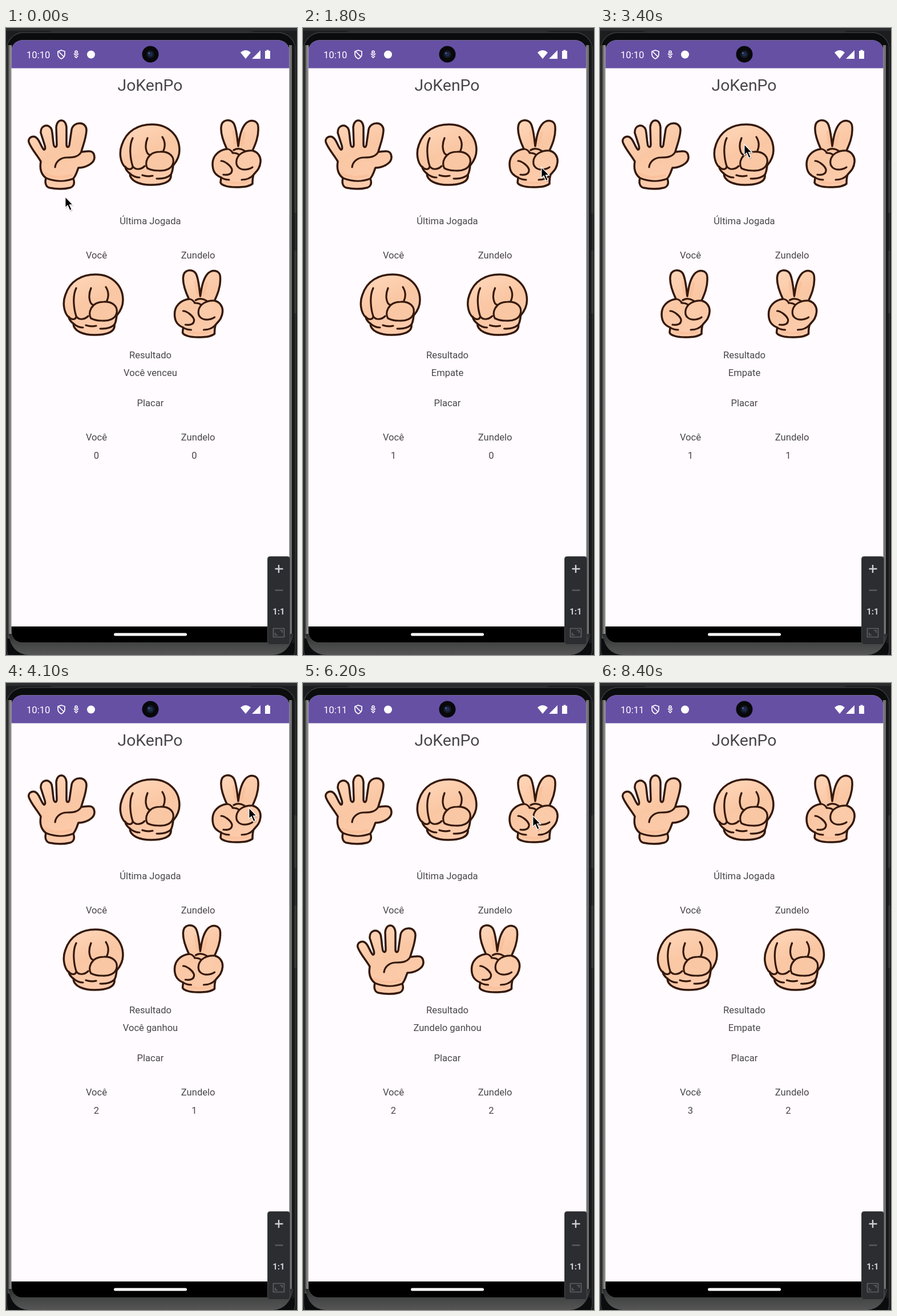
Animation of 510 by 1099 pixels, one loop 9870 ms. Source, as an HTML page:

```html
<!DOCTYPE html>
<html lang="pt">
<head>
<meta charset="utf-8">
<title>JoKenPo</title>
<style>
html, body { margin: 0; width: 100%; height: 100%; overflow: hidden; background: #1c1d1f; }
svg { display: block; width: 510px; height: 1099px; }
text { font: 16.6px Roboto, sans-serif; fill: #49464b; text-anchor: middle; }
.title { font-size: 28.4px; }
.status { fill: #fff; }
.line { fill: none; stroke: #35190c; stroke-width: 3.2; stroke-linecap: round; stroke-linejoin: round; }
.skin { stroke: #35190c; stroke-width: 3.5; stroke-linejoin: round; }
.shade { fill: none; stroke: #f3ad83; stroke-width: 5; stroke-linecap: round; opacity: .3; }
.icon { fill: none; stroke: #fff; stroke-width: 1.7; }
</style>
</head>
<body>
<svg viewBox="0 0 510 1099">
  <defs>
    <linearGradient id="tone" x1="0" y1="0" x2=".45" y2="1">
      <stop offset="0" stop-color="#ffd9bd"/><stop offset=".55" stop-color="#fac7a4"/><stop offset="1" stop-color="#fccbab"/>
    </linearGradient>
    <linearGradient id="rim">
      <stop offset="0" stop-color="#1b1c1d"/><stop offset=".3" stop-color="#4c4c4c"/><stop offset=".6" stop-color="#858483"/><stop offset="1" stop-color="#8f8e8d"/>
    </linearGradient>
    <linearGradient id="base" x1="0" y1="0" x2="0" y2="1">
      <stop offset="0" stop-color="#2a2b2c"/><stop offset=".5" stop-color="#454646"/><stop offset="1" stop-color="#565656"/>
    </linearGradient>
    <clipPath id="screen"><rect x="9.5" y="21.5" width="487" height="1056" rx="19"/></clipPath>

    <g id="paper">
      <path class="skin" fill="url(#tone)" d="M61 234C54 222 43 210 40 200C38 191 49 187 55 194C60 200 61 207 66 213C69 214 69 210 68 206L61 184C60 169 76 167 80 178C82 186 82 198 84 206C86 210 89 209 89 204L88 174C89 158 105 158 106 174L106 204C106 210 110 210 111 205L115 178C118 163 142 163 141 180C140 195 135 205 132 217C140 217 154 211 155 226C156 238 138 245 127 245C124 252 123 258 118 264C121 272 119 278 112 280C100 283 85 282 76 280C69 278 68 270 70 263C61 256 59 245 61 234Z"/>
      <path class="shade" d="M69 256Q91 266 113 258"/>
      <path class="line" d="M86 244C87 234 96 227 107 227C118 227 127 226 132 217M70 263Q95 273 118 264"/>
    </g>

    <g id="rock">
      <path class="skin" fill="url(#tone)" d="M209 244C200 236 198 218 203 205C211 180 232 169 256 169C284 169 304 188 304 214C304 226 299 234 293 241C292 248 292 252 289 257C291 270 275 275 254 275C234 275 217 268 217 255C213 252 210 249 209 244Z"/>
      <path class="line" d="M222 193C215 207 218 230 222 242M248 193C242 207 246 220 251 222M274 191C279 199 279 208 276 215M209 243C214 250 222 248 222 242C226 249 236 249 243 242M217 255Q225 262 234 262M239 258Q248 261 257 259M264 264Q280 265 289 257"/>
      <path class="line" style="fill:#fac7a4" d="M248 246C242 238 247 217 270 217C286 216 295 225 293 236C291 247 279 251 267 250C260 250 254 249 248 246"/>
    </g>

    <g id="scissors">
      <path class="skin" fill="url(#tone)" d="M387 212C381 199 376 186 377 174C378 159 394 159 399 167C404 175 405 192 407 207C409 194 411 180 418 170C426 158 443 161 442 175C443 190 437 204 432 215C441 217 447 225 446 235C445 247 438 252 434 257C432 262 432 266 432 273C424 279 413 279 403 279C389 279 378 276 376 271L377 262C365 257 362 249 362 238C362 225 372 214 387 212Z"/>
      <path class="shade" d="M399 182L402 202M418 184L413 204M386 269Q405 275 424 269"/>
      <path class="line" d="M387 212C391 212 394 214 397 218M399 214Q408 209 418 215M377 233C383 233 394 241 396 248C397 257 388 258 381 257M377 262Q383 266 391 266M413 266Q426 266 433 258"/>
      <path class="line" style="fill:#fbcaa8" d="M432 215C418 214 406 221 404 232C402 244 411 249 421 248Q428 247 432 244"/>
      <path class="line" d="M397 219Q405 219 408 222"/>
    </g>
  </defs>

  <!-- phone body -->
  <rect width="510" height="1099" fill="#1c1d1f"/>
  <path d="M0 0H510V5H432L424 9H84L76 5H0Z" fill="#2b2c2e"/>
  <rect x="1" y="8" width="506" height="1110" rx="30" fill="#0b0c0d" stroke="#3a3b3c" stroke-width="1.5"/>
  <rect x="2" y="30" width="8" height="1040" fill="url(#rim)"/>
  <rect x="496" y="30" width="5" height="1040" fill="#737373"/>
  <rect x="501" y="30" width="5" height="1048" fill="#171819"/>
  <path d="M507 232V324M507 390V500" stroke="#3d3e40" stroke-width="3"/>
  <path d="M4 1062Q10 1098 40 1099H468Q496 1098 504 1062Z" fill="url(#base)"/>

  <g clip-path="url(#screen)">
    <rect x="9" y="21" width="488" height="1057" fill="#fffbfe"/>
    <rect x="9" y="21" width="488" height="49.5" fill="#6650a4"/>
    <rect x="9" y="1049" width="488" height="29" fill="#000"/>
  </g>
  <rect x="189" y="1060.5" width="128" height="5" rx="2.5" fill="#fff"/>

  <!-- status bar -->
  <text id="clock" class="status" x="56.7" y="52.5"></text>
  <g class="icon">
    <path d="M97 39L103 41V46Q103 51 97 54Q91 51 91 46V41ZM92 41L102 51"/>
    <circle cx="123" cy="42" r="2"/>
    <path d="M119 45L123 48L127 45M120 49L123 52L126 49"/>
  </g>
  <circle cx="149" cy="46.5" r="7" fill="#fff"/>
  <circle cx="253" cy="46" r="14.5" fill="#08080b"/>
  <circle cx="253" cy="46" r="7" fill="#141824"/>
  <circle cx="253" cy="46" r="4" fill="#1d2b4b"/>
  <circle cx="250.5" cy="44" r="1.5" fill="#4c68a0"/>
  <path d="M411 43Q420 35 429 43L420 54ZM431 54H446V39ZM454 40H456.5V38.5H460.5V40H463V54H454Z" fill="#fff"/>

  <!-- app -->
  <text class="title" x="252.5" y="110">JoKenPo</text>
  <use href="#paper"/><use href="#rock"/><use href="#scissors"/>
  <text x="253" y="344">Última Jogada</text>
  <text x="158.5" y="404">Você</text>
  <text x="336.7" y="404">Zundelo</text>
  <use id="mine"/><use id="theirs"/>
  <text x="253" y="578.5">Resultado</text>
  <text id="result" x="253" y="610"></text>
  <text x="253" y="662.5">Placar</text>
  <text x="158.5" y="722.5">Você</text>
  <text x="336.7" y="722.5">Zundelo</text>
  <text id="score1" x="158.3" y="754.5"></text>
  <text id="score2" x="329.8" y="754.5"></text>

  <!-- zoom bar -->
  <rect x="458.5" y="926.5" width="39" height="154" rx="4" fill="#2b2d30" stroke="#46484b"/>
  <path d="M471.5 948H485.5M478 941V955" stroke="#ced0d6" stroke-width="2.4"/>
  <path d="M471.5 985.5H485.5" stroke="#5e6064" stroke-width="2.2"/>
  <text x="478" y="1028" style="font-size:15px;font-weight:700;fill:#ced0d6">1:1</text>
  <path d="M468.5 1052.5H487.5V1067.5H468.5ZM472 1060V1064H476M480 1056H484V1060" fill="none" stroke="#5e6064" stroke-width="1.7"/>

  <g id="cursor">
    <path d="M1.5 2V22L6 18L10 27L14 25L10 17H16Z" opacity=".2"/>
    <path d="M.8 .8V20L5 16.2L8.8 24.8L12.2 23.3L8.5 15H14.5Z" stroke="#fff" stroke-width="1.3"/>
  </g>
</svg>
<script>
const LOOP = 9870, STEP = 100;
const WON = "Você ganhou", LOST = "Zundelo ganhou", DRAW = "Empate";

// left shift of each hand from the top row to the player's slot
const shift = { paper: 56, rock: -99, scissors: -254 };

// time, player, opponent, result, score, score
const rounds = [
  [0, "rock", "scissors", "Você venceu", 0, 0],
  [400, "paper", "rock", WON, 1, 0],
  [1300, "rock", "rock", DRAW, 1, 0],
  [2200, "scissors", "rock", LOST, 1, 1],
  [2700, "scissors", "scissors", DRAW, 1, 1],
  [3600, "rock", "scissors", WON, 2, 1],
  [4400, "scissors", "scissors", DRAW, 2, 1],
  [5200, "paper", "scissors", LOST, 2, 2],
  [6300, "scissors", "paper", WON, 3, 2],
  [6800, "scissors", "scissors", DRAW, 3, 2],
  [7400, "rock", "rock", DRAW, 3, 2]
];

// time, x, y of the pointer tip
const path = [
  [0, 103, 295], [300, 96, 226], [800, 96, 226], [1100, 246, 224],
  [1400, 248, 224], [1700, 415, 243], [1800, 417, 243], [2900, 417, 243],
  [3300, 252, 203], [3600, 252, 203], [3900, 423, 220], [4100, 425, 218],
  [4500, 425, 218], [4800, 281, 234], [4900, 281, 234], [5000, 136, 231],
  [5100, 136, 231], [5200, 93, 213], [5600, 93, 225], [5800, 93, 225],
  [6200, 402, 232], [6800, 402, 232], [7100, 196, 219], [7200, 206, 219],
  [7800, 206, 219], [8300, 464, 152]
];

const $ = id => document.getElementById(id);
const setText = (id, value) => { $(id).textContent = value; };

function place(id, hand, offset) {
  $(id).setAttribute("href", "#" + hand);
  $(id).setAttribute("transform", `translate(${shift[hand] + offset} 263)`);
}

function pointer(t) {
  const i = path.findIndex(p => p[0] > t);
  if (i < 0) return path.at(-1).slice(1);
  const [t0, x0, y0] = path[i - 1], [t1, x1, y1] = path[i];
  const k = (t - t0) / (t1 - t0);
  return [x0 + (x1 - x0) * k, y0 + (y1 - y0) * k];
}

function draw(now) {
  const t = Math.floor(now % LOOP / STEP) * STEP;
  const [, mine, theirs, result, a, b] = rounds.findLast(r => r[0] <= t);
  place("mine", mine, 0);
  place("theirs", theirs, 187.5);
  setText("result", result);
  setText("score1", a);
  setText("score2", b);
  setText("clock", t < 4600 ? "10:10" : "10:11");
  $("cursor").setAttribute("transform", `translate(${pointer(t).join(" ")})`);
  $("cursor").style.display = t < 8400 ? "" : "none";
  requestAnimationFrame(draw);
}
draw(0);
</script>
</body>
</html>
```
